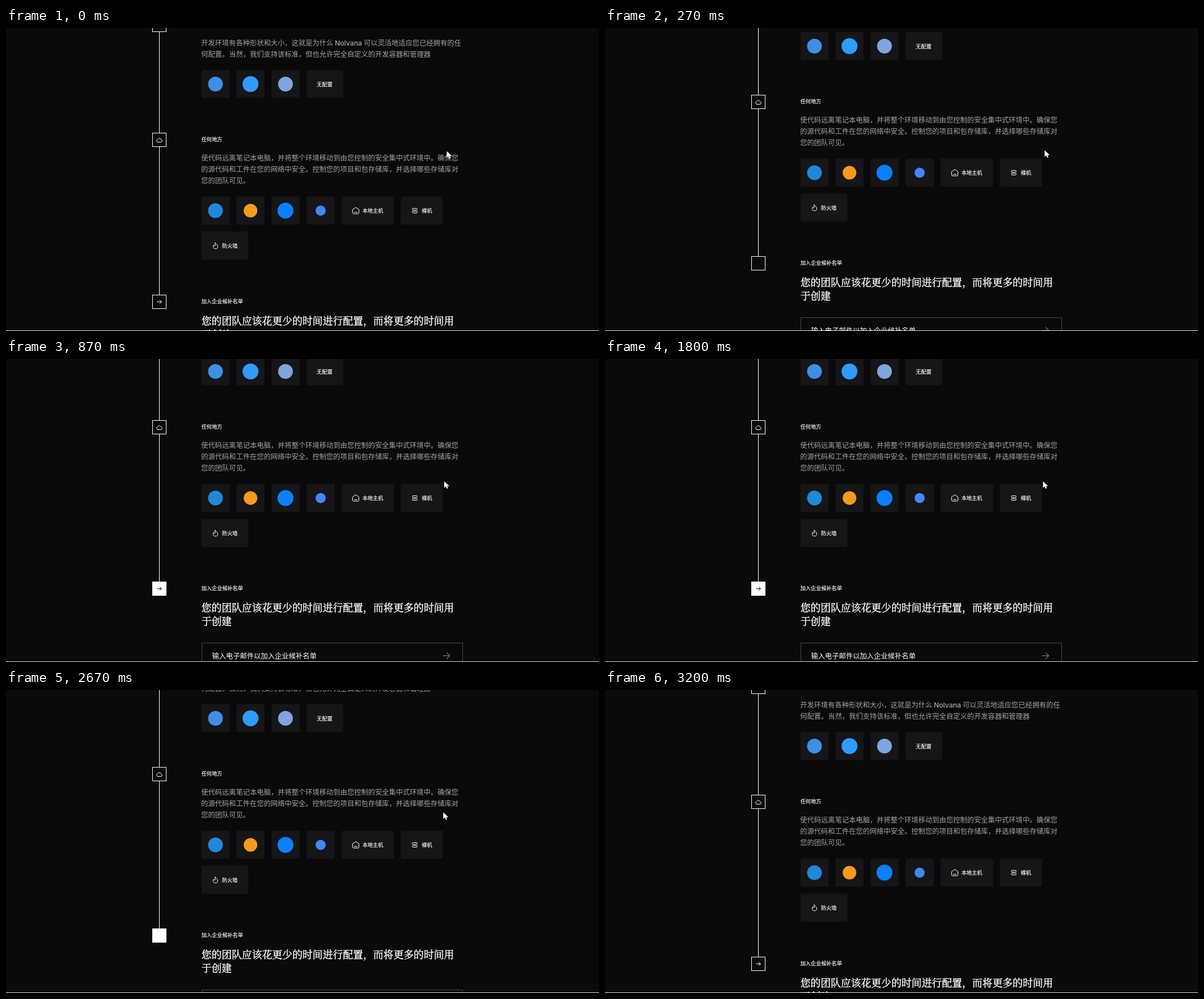
An HTML page for the animation above (3.87 s loop, 1046 by 535 pixels).

```html
<!DOCTYPE html>
<html lang="zh-CN">
<head>
<meta charset="utf-8">
<title>任何地方</title>
<style>
  html, body { margin: 0; width: 100%; height: 100%; overflow: hidden; background: #0a0a0b; }
  svg { display: block; }
  text { font-family: Inter, "Noto Sans CJK SC", "Noto Sans CJK", sans-serif; white-space: pre; }
  .cjk { font-family: "Noto Sans CJK SC", "Noto Sans CJK", sans-serif; }
  .para { font-size: 12.27px; fill: #a3a3a6; }
  .name { font-weight: 500; }
  .small { font-size: 9.2px; fill: #fff; stroke: #fff; stroke-width: .15; }
  .head { font: 17.84px "Noto Serif CJK SC", "Noto Serif CJK", "Noto Serif", "Noto Sans CJK SC", serif; fill: #fff; stroke: #fff; stroke-width: .4; }
  .field { font-size: 12.3px; font-weight: 500; fill: #fff; }
  .tile { fill: #161618; }
  .node { fill: #0a0a0b; stroke: #fff; }
  .icon { fill: none; stroke: #fff; stroke-width: 1; stroke-linecap: round; stroke-linejoin: round; }
</style>
</head>
<body>
<svg id="stage" width="1046" height="535" viewBox="0 0 1046 535">
  <rect width="1046" height="535" fill="#0a0a0b"/>
  <g id="upper"></g>
  <g id="lower"></g>
  <g id="arrow">
    <path d="M0 0V11.6L2.8 9.1L4.7 13L6.7 12.1L5 8.4H9Z" fill="#fff"/>
  </g>
  <g id="beam" fill="none" stroke="#e8e8e8">
    <path d="M-3 -6H-1L0 -5L1 -6H3M0 -5V5M-3 6H-1L0 5L1 6H3"/>
  </g>
  <rect y="534" width="1046" height="1" fill="#e6e3e3"/>
</svg>
<script>
const LOOP = 3870, FPS = 15, FADE = 500;
const FOCUS_ON = 4, FOCUS_OFF = 40;
const $ = id => document.getElementById(id);

function add(parent, tag, attrs, content) {
  const el = document.createElementNS("http://www.w3.org/2000/svg", tag);
  for (const key in attrs) el.setAttribute(key, attrs[key]);
  if (content) el.textContent = content;
  parent.appendChild(el);
  return el;
}

const upper = $("upper"), lower = $("lower");
const label = (g, x, y, kind, str) => add(g, "text", { x, y, class: kind }, str);
const tile = (x, y, width) => add(upper, "rect", { x, y, width, height: 49.5, rx: 2.5, class: "tile" });
const node = (g, y) => add(g, "rect", { x: 258.5, y, width: 24, height: 24, class: "node" });
const icon = (g, x, y, d) => add(g, "path", { d, class: "icon", transform: `translate(${x} ${y})` });
const dot = (cx, cy, r, fill) => add(upper, "circle", { cx, cy, r, fill });

// Timeline rail
add(upper, "rect", { x: 270, y: -20, width: 1, height: 492, fill: "#fff" });
node(upper, -17.5);
node(upper, 185.5);
icon(upper, 270.5, 198, "M-2.4 3.7H2.8A2.3 2.3 0 0 0 3.3 -.8A3.6 3.6 0 0 0 -3.3 -1.3A2.6 2.6 0 0 0 -2.4 3.7Z");

// Configuration section
label(upper, 344.3, 30.5, "para cjk", "开发环境有各种形状和大小，这就是为什么");
add(upper, "text", { x: 604, y: 30.5, class: "para name", "text-anchor": "middle" }, "Nolvana");
label(upper, 631, 30.5, "para cjk", "可以灵活地适应您已经拥有的任");
label(upper, 344.3, 50.5, "para cjk", "何配置。当然，我们支持该标准，但也允许完全自定义的开发容器和管理器");
[345, 406.5, 468.5].forEach(x => tile(x, 74, 49.5));
tile(530.5, 74, 64);
dot(369.5, 99, 13, "#3f8fe8");
dot(431.3, 99, 14, "#2f9bff");
dot(493, 99, 13, "#7ea5dd");
label(upper, 548.3, 102.6, "small cjk", "无配置");

// Anywhere section
label(upper, 344.7, 200, "small cjk", "任何地方");
[
  "使代码远离笔记本电脑，并将整个环境移动到由您控制的安全集中式环境中。确保您",
  "的源代码和工件在您的网络中安全。控制您的项目和包存储库，并选择哪些存储库对",
  "您的团队可见。"
].forEach((line, i) => label(upper, 344.3, 234 + 20 * i, "para cjk", line));
[345, 406.5, 468.5, 530.5].forEach(x => tile(x, 297.5, 49.5));
tile(592, 297.5, 92.5);
tile(696.5, 297.5, 74.5);
tile(345, 359.5, 82.5);
dot(369.5, 322.5, 13, "#2088d8");
dot(431.3, 322.5, 12, "#f79a1c");
dot(493, 322.5, 14, "#0a80ff");
dot(555, 322.5, 9, "#4285f4");
icon(upper, 617, 322.5, "M-5.5 -2L0 -5.7L5.5 -2V4Q5.5 5.5 4 5.5H-4Q-5.5 5.5 -5.5 4ZM-2.6 2.8H2.6");
icon(upper, 721, 322.5, "M-3.3 -4H3.3Q4.2 -4 4.2 -3.2V-1.8Q4.2 -1 3.3 -1H-3.3Q-4.2 -1 -4.2 -1.8V-3.2Q-4.2 -4 -3.3 -4Z" +
  "M-3.3 1H3.3Q4.2 1 4.2 1.8V3.2Q4.2 4 3.3 4H-3.3Q-4.2 4 -4.2 3.2V1.8Q-4.2 1 -3.3 1Z");
icon(upper, 369.5, 384.5, "M-.7 -5.2C.6 -3 4.1 -1.7 4.1 1.3A4.1 4 0 0 1 -4.1 1.3C-4.1 -.2 -3.5 -1.1 -2.8 -1.8C-2.4 .6 -.6 .7 -.2 -.6C.2 -2 -1.3 -3.1 -.7 -5.2Z");
label(upper, 628.7, 326, "small cjk", "本地主机");
label(upper, 733.3, 326, "small cjk", "裸机");
label(upper, 381, 388, "small cjk", "防火墙");

// Waitlist section
const badge = node(lower, 471.5);
const badgeIcon = icon(lower, 270.5, 483.5, "M-3.8 0H3.8M.7 -3.1L3.8 0L.7 3.1");
label(lower, 344.7, 485.6, "small cjk", "加入企业候补名单");
label(lower, 344.7, 524, "head", "您的团队应该花更少的时间进行配置，而将更多的时间用");
label(lower, 344.7, 548, "head", "于创建");
add(lower, "rect", { x: 345.5, y: 579.5, width: 460, height: 46, fill: "none", stroke: "#48484b" });
label(lower, 363.5, 606.6, "field cjk", "输入电子邮件以加入企业候补名单");
icon(lower, 777, 602, "M-5.8 0H5.8M.6 -5.2L5.8 0L.6 5.2").style.cssText = "stroke:#68686b;stroke-width:1.4";

// Keys are [tick, value, ...], ticks at 15 per second
const SCROLL = [[2, 0], [3, 27.7], [4, 67.3], [5, 77.3], [39, 77.3], [40, 49.3], [41, 10], [42, 0]];
const POINTER = [[2, 777.5, 217.5], [4, 775.5, 216], [10, 775.5, 216], [11, 774, 216], [13, 773, 216],
  [26, 773, 216], [30, 771.3, 216], [40, 771.3, 216], [42, 748.5, 229.5]];

function at(keys, tick) {
  const i = keys.findIndex(key => key[0] >= tick);
  if (i < 0) return keys[keys.length - 1].slice(1);
  if (i === 0) return keys[0].slice(1);
  const a = keys[i - 1], b = keys[i], p = (tick - a[0]) / (b[0] - a[0]);
  return a.slice(1).map((v, n) => v + (b[n + 1] - v) * p);
}

function ease(tick, start) {
  const p = Math.min(1, Math.max(0, (tick - start) * 1000 / FPS / FADE));
  return (1 - Math.cos(Math.PI * p)) / 2;
}

function draw(time) {
  const tick = Math.floor((time % LOOP + 4) * FPS / 1000);
  const [scroll] = at(SCROLL, tick);
  upper.setAttribute("transform", `translate(0 ${Math.round(-scroll)})`);
  // This block sits on a fractional row, so it snaps separately
  lower.setAttribute("transform", `translate(0 ${Math.round(-0.4 - scroll)})`);

  const glow = 10 + 245 * (ease(tick, FOCUS_ON) - ease(tick, FOCUS_OFF));
  badge.style.fill = `rgb(${glow},${glow},${glow})`;
  const focused = tick >= FOCUS_ON && tick < FOCUS_OFF;
  badgeIcon.style.stroke = focused ? "#0a0a0b" : "#fff";

  const [x, y] = at(POINTER, tick);
  for (const [id, shown] of [["arrow", tick < 42], ["beam", tick === 42]]) {
    $(id).setAttribute("transform", `translate(${x} ${y})`);
    $(id).style.display = shown ? "" : "none";
  }
}

const start = performance.now();
function loop() {
  draw(performance.now() - start);
  requestAnimationFrame(loop);
}
loop();
</script>
</body>
</html>
```
